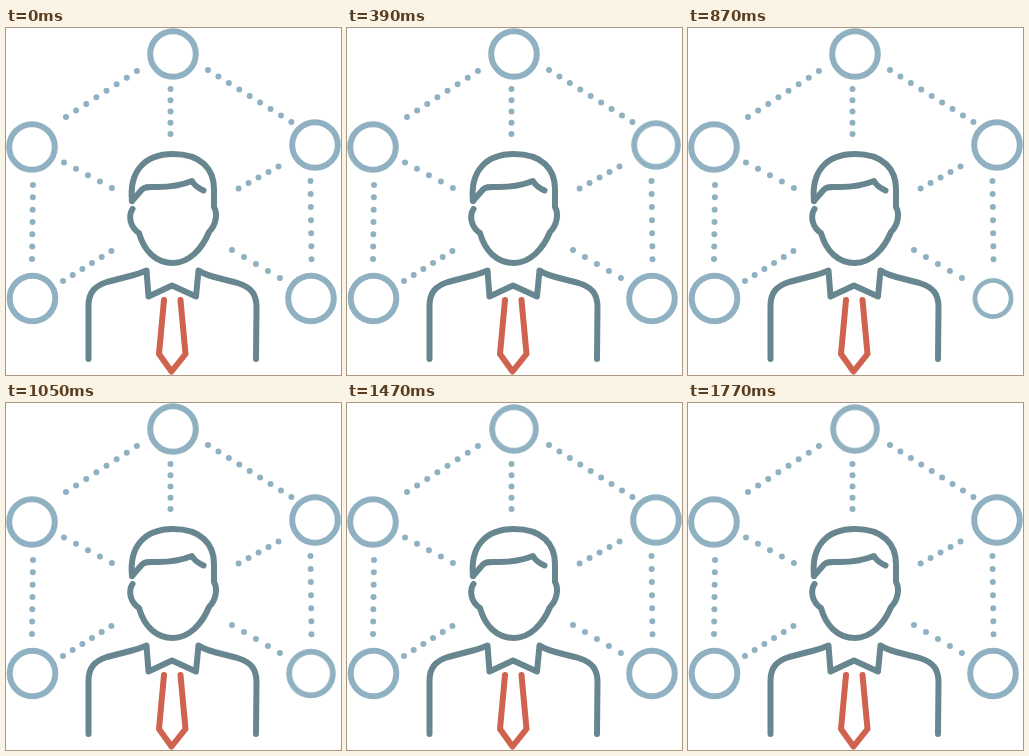
Animation, 335 px wide and 347 px high, one loop 1.8 s. Source, as an HTML page:

```html
<!DOCTYPE html>
<html lang="en">
<head>
<meta charset="utf-8">
<title>Connected person</title>
<style>
  html, body { margin: 0; width: 100%; height: 100%; overflow: hidden; background: #fff; }
  svg { display: block; width: 335px; height: 347px; }
  svg * { fill: none; stroke-width: 6; stroke-linecap: round; stroke-linejoin: round; }
  .dots line { stroke: #90b1c1; stroke-dasharray: 0 1; }
  .person path { stroke: #67868f; }
  .person .tie { stroke: #d0634f; }
  .nodes circle {
    stroke: #90b1c1;
    transform-box: fill-box;
    transform-origin: center;
    animation: pulse 1800ms calc(var(--i) * 360ms) infinite;
  }
  /* Each node shrinks and regrows in its fifth of the loop, at 30 ms per step. */
  @keyframes pulse {
    0% { transform: scale(1); animation-timing-function: steps(6, end); }
    10% { transform: scale(.75); animation-timing-function: steps(6, end); }
    20%, 100% { transform: scale(1); }
  }
</style>
</head>
<body>
<svg viewBox="0 0 335 347">
  <!-- pathLength is the number of gaps, plus a little to keep the last dot -->
  <g class="dots">
    <line x1="60" y1="89" x2="131" y2="43" pathLength="7.01"/>
    <line x1="202" y1="42" x2="285.5" y2="94" pathLength="8.01"/>
    <line x1="164.5" y1="61" x2="164.5" y2="106" pathLength="4.01"/>
    <line x1="27" y1="157" x2="26" y2="231" pathLength="6.01"/>
    <line x1="304.5" y1="153" x2="305.5" y2="231.5" pathLength="6.01"/>
    <line x1="58" y1="134.5" x2="106" y2="160" pathLength="4.01"/>
    <line x1="272.5" y1="138.5" x2="232.5" y2="160.5" pathLength="4.01"/>
    <line x1="57" y1="253" x2="105.5" y2="223" pathLength="5.01"/>
    <line x1="226" y1="222" x2="274" y2="250" pathLength="4.01"/>
  </g>
  <g class="person">
    <path d="M126 173C123 144 138 126 167 126C195 126 208 141 208 161V179C212 186 210 197 203 204C196 221 183 235 167 235C150 235 138 223 133 205C124 199 122 188 126.5 181"/>
    <path d="M126 173L136 161.500C139 158 143 159 152 159C166 159 176 157 186 153C188 157 192 160 197.500 162.500"/>
    <path d="M82.500 331V278C82.500 264 89 258 101 254L126 247.500C132 246 137 244 140.500 242.500L142.500 268.500L166 257.500L190 268.500L192.500 242.500C201 249 219 251 233 255.500C245 259.500 250.500 266 250.500 279L250 331"/>
    <path class="tie" d="M158 272L153 326L165.500 343.500L179.500 326L174.500 272"/>
  </g>
  <g class="nodes">
    <circle cx="26.5" cy="270.5" r="22.8" style="--i:0"/>
    <circle cx="309" cy="117" r="22.8" style="--i:1"/>
    <circle cx="305" cy="270.5" r="22.8" style="--i:2"/>
    <circle cx="26" cy="119" r="22.8" style="--i:3"/>
    <circle cx="167" cy="26" r="22.8" style="--i:4"/>
  </g>
</svg>
</body>
</html>
```
